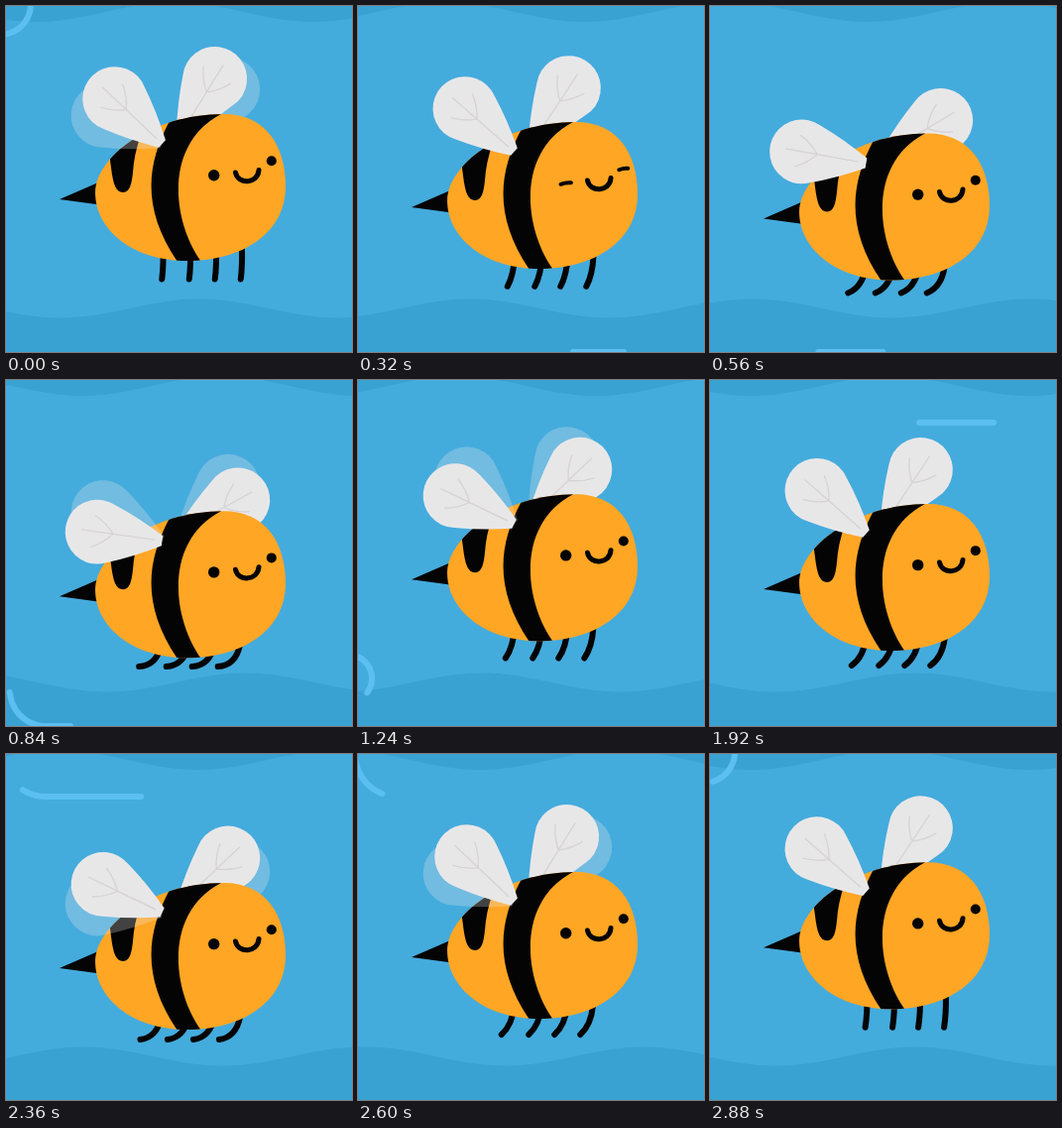
An HTML page with a canvas for the animation above (2920 ms loop, 349 by 349 pixels).

```html
<!DOCTYPE html>
<html lang="en">
<head>
<meta charset="utf-8">
<title>Flying bee</title>
<style>
  html, body { margin: 0; width: 100%; height: 100%; overflow: hidden; background: #44abdd; }
  canvas { display: block; width: 100vw; height: 100vh; }
</style>
</head>
<body>
<canvas id="stage" width="349" height="349"></canvas>
<script>
const ctx = document.getElementById('stage').getContext('2d');
const SIZE = 349, STEP = 40, LOOP = 2920, CYCLE = 2880, BOB = 1440, FLAP = 320;
const SKY = '#44abdd', WAVE = '#3aa2d2', WIND = '#5bc0f1';
const ORANGE = '#ffa624', BLACK = '#050404', WING = '#e8e7e8', VEIN = '#d7d4d5';
const GHOST = 'rgba(233,231,232,.27)';

const BODY = new Path2D('M90 188 C90 154 144 109 220 109 C261 109 282 140 282 182 C282 228 240 257 182 257 C128 257 90 226 90 188 Z');
const STRIPE = new Path2D('M168 108 L165.5 115 C141 160 137 205 173 258 L197 258 C168 218 158 140 217 109 L217 100 Z');
const PATCH = new Path2D('M104 148 L106 163 C108 180 111 188 118 188 C126 188 127 176 128 168 Q129 150 136 130 Z');
const STINGER = new Path2D('M54 195 L100 175 L100 201 L91 200 Z');
const SMILE = new Path2D('M231.5 168 C234 180.5 254 179.5 255 165.5');

const mod = (a, n) => ((a % n) + n) % n;
const clamp = x => Math.max(0, Math.min(1, x));
const smooth = x => x * x * (3 - 2 * x);
const cubic = x => x < .5 ? 4 * x ** 3 : 1 - 4 * (1 - x) ** 3;

// 0 -> 1 -> 0 over one period
function swing(time, period, ease) {
  const p = mod(time, period) / period * 2;
  return ease(p < 1 ? p : 2 - p);
}

function keyed(time, keys) {
  if (time <= keys[0][0]) return keys[0][1];
  for (let i = 1; i < keys.length; i++) {
    const [t0, a] = keys[i - 1], [t1, b] = keys[i];
    if (time <= t1) return a + (b - a) * (time - t0) / (t1 - t0);
  }
  return keys[keys.length - 1][1];
}

function stroke(path, color, width) {
  ctx.strokeStyle = color;
  ctx.lineWidth = width;
  ctx.lineCap = ctx.lineJoin = 'round';
  ctx.stroke(path);
}

function fill(path, color) {
  ctx.fillStyle = color;
  ctx.fill(path);
}

function drawWave(edge, mid, height, peak, shift) {
  const path = new Path2D();
  path.moveTo(0, edge);
  for (let x = 0; x <= SIZE + 3; x += 3) {
    path.lineTo(x, mid + height * Math.cos((x - peak + shift) * Math.PI / 140));
  }
  path.lineTo(SIZE + 3, edge);
  fill(path, WAVE);
}

// A straight run to the left that ends in a tighter curl further left
function windPoint(d, gust) {
  if (d < 260) return [300 - d, gust.y];
  const turn = (d - 260) / 37;
  const k = smooth(clamp((turn - 1.4) / 2));
  const r = gust.r - 12 * k;
  const cx = 40 - gust.drift * k;
  const cy = gust.y - gust.r - gust.lift * k;
  return [cx - r * Math.sin(turn), cy + r * Math.cos(turn)];
}

const GUSTS = [
  { y: 349, r: 36, drift: 50, lift: 12, start: 0,
    head: [[90, 0], [280, 83], [800, 316], [1200, 458], [1420, 545]],
    tail: [[200, 0], [280, 32], [800, 235], [1200, 391], [1600, 545]] },
  { y: 43, r: 43, drift: 46, lift: 2, start: 1600,
    head: [[1680, 0], [1880, 89], [2320, 281], [2840, 482], [3000, 545]],
    tail: [[1840, 0], [1880, 14], [2320, 164], [2880, 420], [3040, 545]] }
];

function drawGust(gust, u) {
  const time = u < gust.start ? u + CYCLE : u;
  const head = keyed(time, gust.head), tail = keyed(time, gust.tail);
  if (head - tail < 1) return;
  const path = new Path2D();
  path.moveTo(...windPoint(tail, gust));
  for (let d = tail + 3; d < head; d += 3) path.lineTo(...windPoint(d, gust));
  path.lineTo(...windPoint(head, gust));
  stroke(path, WIND, 6);
}

const wingShape = (() => {
  const reach = 66, r = 32.4, tip = 5, bulge = 2.5;
  const a = Math.acos(-(r - tip) / reach);
  const x = reach + r * Math.cos(a), y = r * Math.sin(a);
  const path = new Path2D();
  path.moveTo(0, -tip);
  path.quadraticCurveTo(x / 2, -(y + tip) / 2 - bulge, x, -y);
  path.arc(reach, 0, r, -a, a);
  path.quadraticCurveTo(x / 2, (y + tip) / 2 + bulge, 0, tip);
  path.closePath();
  return path;
})();
const VEINS = new Path2D('M8 0 L82 0 M50 0 Q58 10 70 16 M50 0 Q58 -10 70 -16');

function drawWing(x, y, side, degrees, ghost) {
  ctx.save();
  ctx.translate(x, y);
  ctx.scale(side, 1);
  ctx.rotate(-degrees * Math.PI / 180);
  fill(wingShape, ghost ? GHOST : WING);
  if (!ghost) stroke(VEINS, VEIN, 1.4);
  ctx.restore();
}

function drawWingPair(u, x, y, side, low, range) {
  const angle = time => low + range * (1 - swing(time, FLAP, cubic));
  if (u / STEP % 2 === 0) drawWing(x, y, side, angle(u + 2 * STEP), true);
  drawWing(x, y, side, angle(u), false);
}

function drawLegs(bend) {
  const a = bend * 46 * Math.PI / 180;
  for (const x of [158.5, 186, 212, 238]) {
    const path = new Path2D();
    path.moveTo(x - 2 * bend, 244);
    path.quadraticCurveTo(x + .5 - 7 * bend, 262 + 3 * bend,
      x - 1 - 32.6 * Math.sin(a), 243.5 + 32 * Math.cos(a));
    stroke(path, BLACK, 6);
  }
}

function drawEye(x, y, r, closed) {
  const path = new Path2D();
  if (closed) {
    path.moveTo(x - r + .5, y + 1);
    path.quadraticCurveTo(x, y - 1, x + r - .5, y - .5);
    stroke(path, BLACK, 4);
  } else {
    path.arc(x, y, r, 0, Math.PI * 2);
    fill(path, BLACK);
  }
}

function drawBee(u) {
  const closed = u >= 200 && u <= 360;
  ctx.save();
  ctx.translate(0, 24 * swing(u, BOB, smooth));
  drawWingPair(u, 176, 129.5, 1, 28.8, 29.5);
  fill(STINGER, BLACK);
  drawLegs(swing(u - STEP, BOB, smooth));
  fill(BODY, ORANGE);
  ctx.save();
  ctx.clip(BODY);
  fill(STRIPE, BLACK);
  fill(PATCH, BLACK);
  ctx.restore();
  drawEye(209.7, 170.7, 5.7, closed);
  drawEye(267.8, 156.2, 5, closed);
  stroke(SMILE, BLACK, 5);
  drawWingPair(u, 157.5, 139, -1, 7.9, 35.6);
  ctx.restore();
}

function draw(t) {
  // the opening pose is held for one extra step
  const u = Math.max(0, Math.floor(mod(t, LOOP) / STEP) - 1) * STEP;
  const shift = u / CYCLE * 840;
  ctx.fillStyle = SKY;
  ctx.fillRect(0, 0, SIZE, SIZE);
  drawWave(0, 6, 10, 30, shift);
  drawWave(SIZE, 305, -9.5, 195, shift);
  for (const gust of GUSTS) drawGust(gust, u);
  drawBee(u);
}

const begin = performance.now();
function tick() {
  draw(performance.now() - begin);
  requestAnimationFrame(tick);
}
tick();
</script>
</body>
</html>
```
